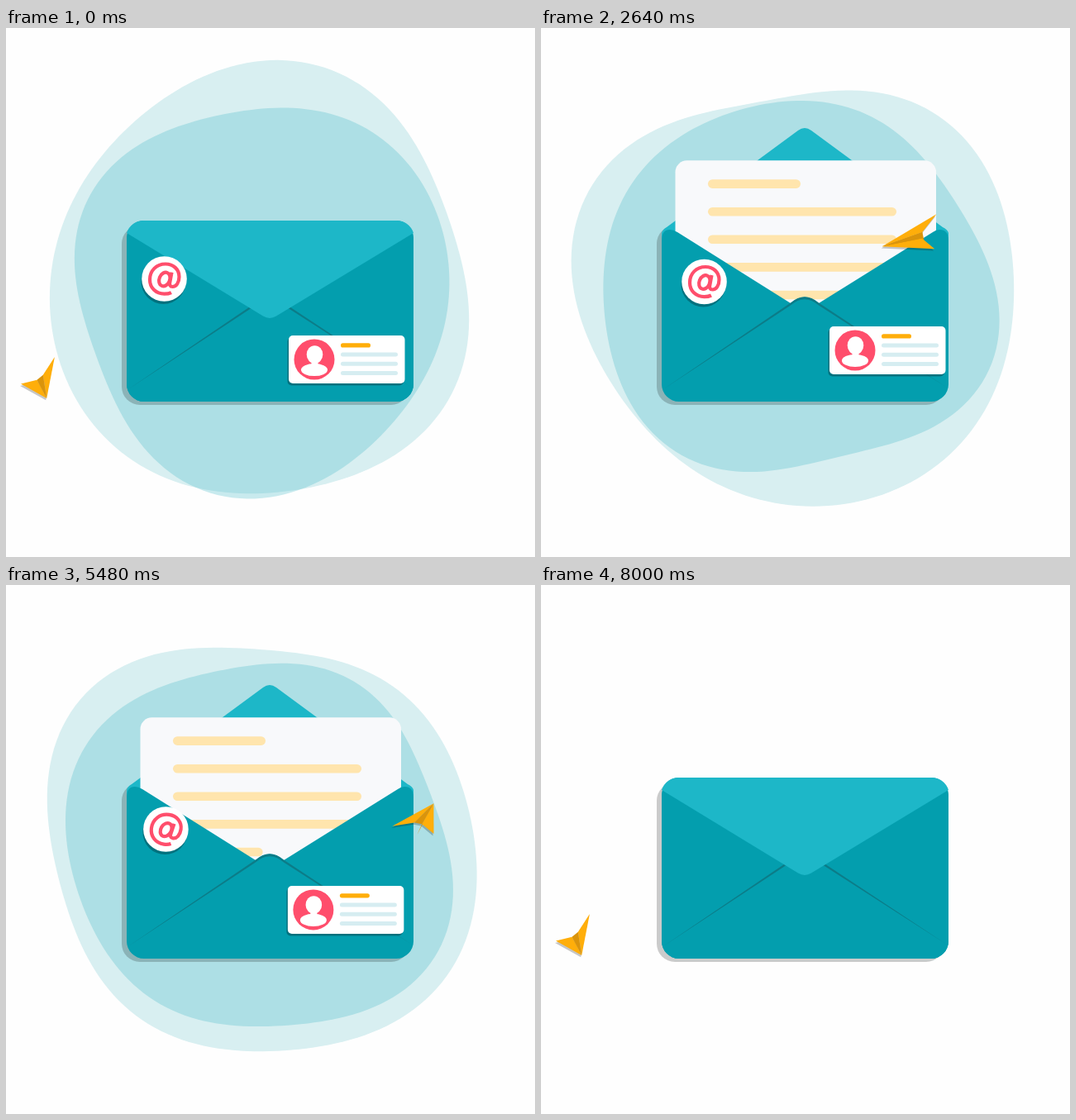
Recreate the animation shown at these times as an HTML page with a canvas. Size 640x640 px, loop 8.04 s.

```html
<!DOCTYPE html>
<html>
<head>
<meta charset="utf-8">
<style>
html, body { margin: 0; width: 100%; height: 100%; overflow: hidden; background: #fefefe; }
canvas { display: block; }
</style>
</head>
<body>
<canvas id="stage" width="640" height="640"></canvas>
<script>
const g = document.getElementById('stage').getContext('2d');
const { PI, sin, cos } = Math;
const LOOP = 8040, VISIBLE = 8000, CYCLE = 4000;
const TEAL = '#039eae', FLAP = '#1db7c8', FOLD = '#0c7c88', PINK = '#ff4e6c';
const ORANGE = '#ffae0a', DARK_ORANGE = '#da940b', SHADE = 'rgba(0,70,80,.5)';

// time, badge x, y, degrees, card x, y
const driftKeys = [
  [0, 191.5, 303.5, 0, 342, 372],
  [1080, 203, 308, 15, 342, 366],
  [2640, 197.5, 307, 0, 349, 361],
  [3400, 198, 313, 25, 343.5, 360],
  [4560, 182.5, 300, 0, 340, 367],
  [6600, 207.5, 294, 20, 342.5, 360.5]
];
// time, nose x, y, degrees ahead of a steady turn, slant of the wings
const planeKeys = [
  [0, 49, 448, 82, -.4],
  [560, 184, 412, 50, .32],
  [1080, 400, 324, 50, -.05],
  [1850, 588, 222, 70, 0],
  [2250, 532, 230, 45, .1],
  [2640, 413, 264, 26, .22],
  [3400, 105, 385, 78, -.05],
  [3750, 19, 428, 92, -.2]
];

const ease = x => x < .5 ? 4 * x ** 3 : 1 - 4 * (1 - x) ** 3;
const ramp = (t, from, span) => Math.max(0, Math.min(1, (t - from) / span));
// Rises at `up`, falls again at `down`, both taking `span` ms
const pulse = (t, up, down, span) => ease(ramp(t, up, span)) - ease(ramp(t, down, span));

// Smooth periodic curve through rows of [time, ...values]
function sample(keys, t, period) {
  const n = keys.length;
  const key = i => {
    const turn = Math.floor(i / n), k = keys[i - turn * n];
    return [k[0] + turn * period, ...k.slice(1)];
  };
  let i = 0;
  while (key(i + 1)[0] <= t) i++;
  const [a, b, c, d] = [key(i - 1), key(i), key(i + 1), key(i + 2)];
  const h = c[0] - b[0], u = (t - b[0]) / h;
  return b.slice(1).map((_, j) => {
    const p = b[j + 1], q = c[j + 1];
    const m = (q - a[j + 1]) / (c[0] - a[0]) * h;
    const k = (d[j + 1] - p) / (d[0] - b[0]) * h;
    return p + u * (m + u * (3 * (q - p) - 2 * m - k + u * (2 * (p - q) + m + k)));
  });
}

function fill(color, path) {
  g.fillStyle = color;
  g.fill(typeof path === 'string' ? new Path2D(path) : path);
}
function box(color, x, y, w, h, r) {
  const p = new Path2D();
  p.roundRect(x, y, w, h, r);
  fill(color, p);
}
function oval(color, x, y, rx, ry = rx) {
  const p = new Path2D();
  p.ellipse(x, y, rx, ry, 0, 0, 7);
  fill(color, p);
}
const poly = (color, ...pts) => fill(color, 'M' + pts.join('L') + 'Z');

// Blob radius at angle a; c and s are the cosine and sine of the loop's phase
const outerRadius = (a, c, s) => 258.3 - c + 2 * s
  + (3 * s - 2 * c) * cos(a) + (6.5 - 6 * c + 1.5 * s) * sin(a)
  + (4 - 9 * c + s) * cos(2 * a) + (4.5 - 6 * c - 5 * s) * sin(2 * a)
  - (3 + 6 * s) * cos(3 * a) + (10.8 * c - 2.4 * s - 1.6) * sin(3 * a)
  + (3 * c + 2.5 * s - 3.7) * cos(4 * a) + 3.7 * sin(4 * a);
const innerRadius = (a, c, s) => 230.3 + 1.5 * s
  + (2.2 * c - 2.4) * cos(a) + (9.3 + 3.7 * c) * sin(a)
  + (3 - 8 * c + s) * cos(2 * a) + (2.6 - 4 * c - 4 * s) * sin(2 * a)
  + (1 + 5.2 * s) * cos(3 * a) + (.8 - 11 * c + 2.5 * s) * sin(3 * a)
  + (2.7 * c + 1.2 * s - 2.4) * cos(4 * a) + (6 - 1.5 * c) * sin(4 * a);

function blob(color, radius, t) {
  const phase = 2 * PI * t / VISIBLE, pts = [];
  for (let a = 0; a < 2 * PI; a += PI / 90) {
    const r = radius(a, cos(phase), sin(phase));
    pts.push([310 + r * cos(a), 310 + r * sin(a)]);
  }
  poly(color, ...pts);
}

function flap(tip, base, front) {
  const y = tip - 8 * (tip - base) / 172;
  const point = `L327 ${y}Q319 ${tip} 311 ${y}Z`;
  fill(FLAP, front
    ? `M146 ${base}A21 21 0 0 1 167 233H472A21 21 0 0 1 493 ${base}` + point
    : `M493 258V${base + 3}Q492 ${base - 1} 486 ${base - 4}` + point.slice(0, -1) +
      `L152 ${base - 4}Q147 ${base - 1} 146 ${base + 3}V258Z`);
}

function letter(y, c) {
  box('#f8f9fb', 162.5, y, 315.5, 190, 14);
  for (let i = 0; i < 5; i++) {
    const w = (i ? 228 : 112) * ramp(c, 720 + 170 * i, 170);
    if (w > 0) box('#ffe5ad', 202, y + 23 + i * 33.6, w, 10.6, Math.min(w / 2, 5.3));
  }
}

function pocket() {
  fill(TEAL, 'M146 257Q146 244 156 244Q160 244 165 247L302 333Q319 318 336 333L474 247' +
    'Q478 244 482 244Q493 244 493 257V431A21 21 0 0 1 472 452H167A21 21 0 0 1 146 431Z');
  fill(FOLD, 'M148 437L302 332.5Q319 318 336 332.5L491 435L336 335.5Q319 321 302 335.5Z');
}

function envelope(c) {
  const open = pulse(c, 160, 3270, 563);
  const tip = 353.5 - 235.5 * open, front = tip > 246;
  box('rgba(0,0,0,.2)', 140, 239, 348, 217, 22);
  if (front) box(TEAL, 146, 233, 347, 219, 21);
  else flap(tip, 245, false);
  letter(236.3 - 76 * pulse(c, 700, 2830, 446), c);
  pocket();
  if (front) flap(tip, 248, true);
}

function badge(x, y, deg) {
  oval(SHADE, x - 1, y + 3.5, 27);
  oval('#fff', x, y, 27.3);
  g.save();
  g.translate(x, y);
  g.rotate(deg * PI / 180);
  const sign = new Path2D('M8.5 16.5C5.5 18 2.5 18.2 0 18.2C-10 18.2 -17.5 11 -17.5 1' +
    'C-17.5 -10 -9.5 -18 1.5 -18C11 -18 18 -11.5 18 -2.5C18 4.5 14.5 9.5 10 9.5' +
    'C7 9.5 6 7.5 6.8 4L9 -8');
  sign.moveTo(6.5, 3);
  sign.ellipse(.3, .5, 6.3, 8.6, .4, 0, 2 * PI);
  g.strokeStyle = PINK;
  g.lineWidth = 4.2;
  g.stroke(sign);
  g.restore();
}

function card(x, y) {
  g.save();
  g.translate(x, y);
  box(SHADE, -1.5, 2.5, 140.5, 58, 5);
  box('#fff', 0, 0, 140.5, 58, 5);
  oval(PINK, 31, 29, 24.5);
  oval('#fff', 31.5, 23, 9.8, 10.8);
  box('#fff', 27.5, 29, 8, 9, 2);
  oval('#fff', 31, 41.5, 16, 7.6);
  box(ORANGE, 63, 9.3, 36, 5.2, 2.6);
  for (let i = 0; i < 3; i++) box('#d6edf1', 63, 20.6 + 11.2 * i, 69, 5, 2.5);
  g.restore();
}

function plane(c) {
  const [x, y, lead, slant] = sample(planeKeys, c, CYCLE);
  const turn = (lead - 360 * c / CYCLE) * PI / 180;
  const tail = [-76 * cos(turn), -34 * sin(turn)];
  const wing = [slant * tail[0] - 25 * sin(turn), slant * tail[1] + 20 * cos(turn)];
  // Point at a share of the tail and of the right wing, seen from the nose
  const at = (along, side, drop = 0) =>
    [x + along * tail[0] + side * wing[0], y + along * tail[1] + side * wing[1] + drop];
  const nose = [x, y], right = at(1, 1), left = at(1, -1);
  const foldA = at(.75, .18), foldB = at(.75, -.18), keel = at(.8, 0, 12);
  g.save();
  g.translate(-1, 2.3);
  poly('rgba(0,0,0,.22)', nose, right, foldA, foldB, left);
  g.restore();
  poly(DARK_ORANGE, nose, foldA, keel);
  poly(ORANGE, nose, right, foldA);
  poly(ORANGE, nose, foldB, left);
  poly(DARK_ORANGE, nose, foldA, foldB);
}

function draw(t) {
  const c = t % CYCLE, dressed = t < VISIBLE;
  g.fillStyle = '#fefefe';
  g.fillRect(0, 0, 640, 640);
  if (dressed) {
    blob('#d8eff1', outerRadius, t);
    blob('rgba(78,187,200,.31)', innerRadius, t);
  }
  envelope(c);
  if (dressed) {
    const [badgeX, badgeY, deg, cardX, cardY] = sample(driftKeys, t, VISIBLE);
    badge(badgeX, badgeY, deg);
    card(cardX, cardY);
  }
  plane(c);
}

const start = performance.now();
function tick() {
  draw((performance.now() - start) % LOOP);
  requestAnimationFrame(tick);
}
tick();
</script>
</body>
</html>
```
